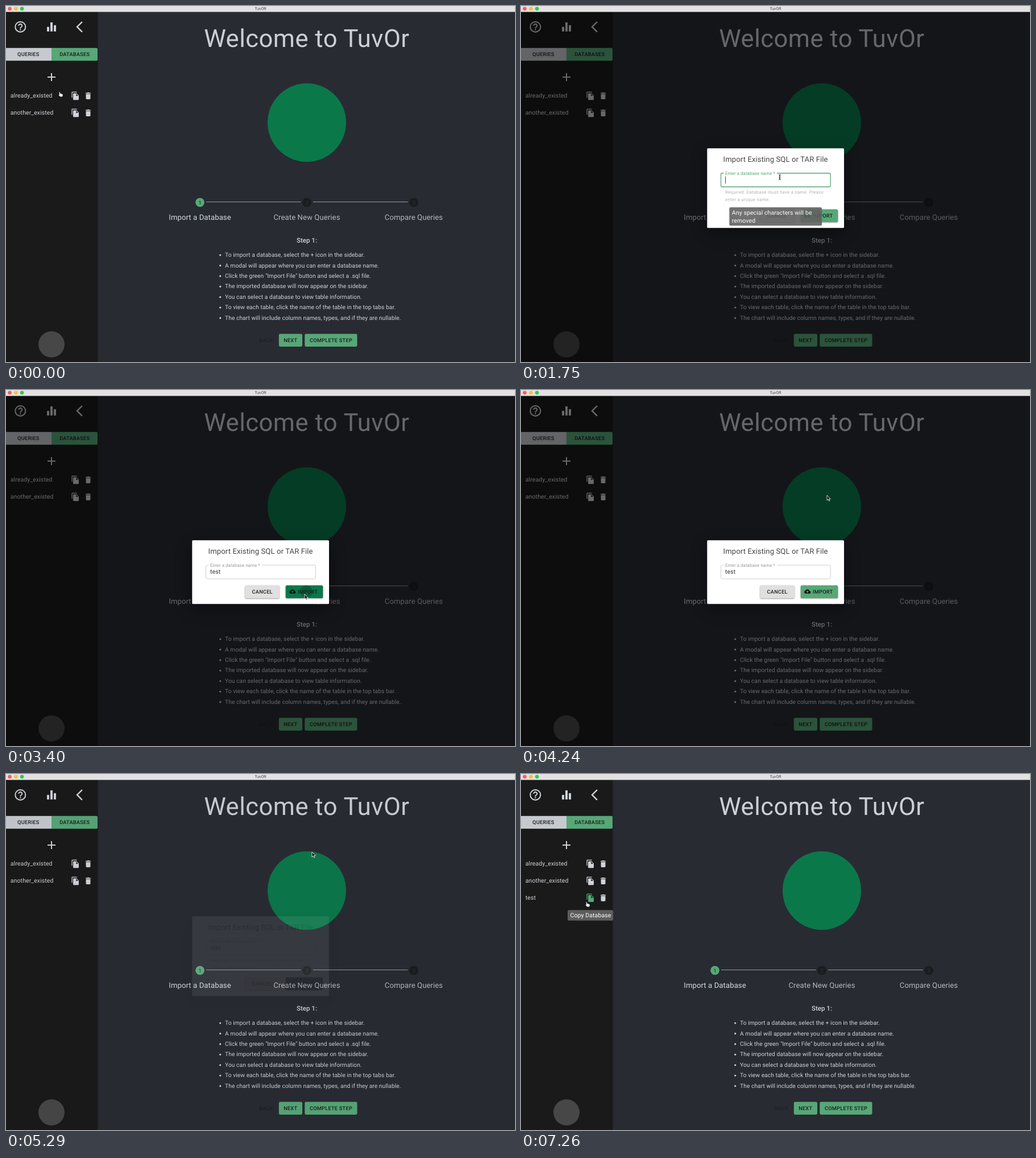
Animation, 895 px wide and 626 px high, one loop 8000 ms. Source, as an HTML page:

```html
<!DOCTYPE html>
<html lang="en">
<head>
<meta charset="utf-8">
<title>Database import</title>
<style>
  html, body { margin: 0; width: 100%; height: 100%; overflow: hidden; background: #292b33; }
  svg { display: block; width: 100vw; height: 100vh; }
  text { font-family: Roboto, sans-serif; white-space: pre; text-rendering: geometricPrecision; }
  .body { font-size: 10.5px; letter-spacing: .1px; }
  .item { font-size: 10.25px; letter-spacing: .06px; }
  .btn { font-size: 9.19px; font-weight: 500; letter-spacing: .26px; }
  .h6 { font-size: 13.1px; letter-spacing: .1px; }
  .helper { font-size: 7.87px; letter-spacing: .262px; }
  .mid { text-anchor: middle; }
  .raised { filter: drop-shadow(0 1px 1.2px rgba(0,0,0,.4)); }
  #paper { filter: drop-shadow(0 8px 14px rgba(0,0,0,.4)); }
</style>
</head>
<body>
<svg id="stage" viewBox="0 0 895 626" preserveAspectRatio="none"></svg>
<script>
const LOOP = 8000;
const GREEN = '#57a777', DEEP = '#0b784a', LIGHT = '#d0d3d8';

const icons = {
  help: 'M11 18h2v-2h-2zM12 2a10 10 0 1 0 0 20a10 10 0 1 0 0-20zm0 18a8 8 0 1 1 0-16a8 8 0 1 1 0 16zM12 6c-2.2 0-4 1.8-4 4h2c0-1.1.9-2 2-2s2 .9 2 2c0 2-3 1.75-3 5h2c0-2.25 3-2.5 3-5 0-2.2-1.8-4-4-4z',
  chart: 'M10 20h4V4h-4zM4 20h4v-8H4zM16 9v11h4V9z',
  copy: 'M16 1H4c-1.1 0-2 .9-2 2v14h2V3h12zM15 5l6 6v10c0 1.1-.9 2-2 2H8c-1.1 0-2-.9-2-2V7c0-1.1.9-2 2-2zM14 12h5.5L14 6.5z',
  trash: 'M6 19c0 1.1.9 2 2 2h8c1.1 0 2-.9 2-2V7H6zM19 4h-3.5l-1-1h-5l-1 1H5v2h14z',
  cloud: 'M19.35 10C18.7 6.6 15.6 4 12 4 9.1 4 6.6 5.6 5.35 8 2.3 8.4 0 10.9 0 14c0 3.3 2.7 6 6 6h13c2.8 0 5-2.2 5-5 0-2.6-2-4.8-4.65-5zM14 13v4h-4v-4H7l5-5 5 5z'
};

const rect = (x, y, w, h, fill, extra = '') =>
  `<rect x="${x}" y="${y}" width="${w}" height="${h}" fill="${fill}" ${extra}/>`;
const circle = (x, y, r, fill, extra = '') =>
  `<circle cx="${x}" cy="${y}" r="${r}" fill="${fill}" ${extra}/>`;
const text = (x, y, str, cls, fill = LIGHT, extra = '') =>
  `<text x="${x}" y="${y}" class="${cls}" fill="${fill}" ${extra}>${str}</text>`;
const line = (d, color, width, extra = '') =>
  `<path d="${d}" fill="none" stroke="${color}" stroke-width="${width}" ${extra}/>`;
const icon = (name, x, y, scale, fill = LIGHT, extra = '') =>
  `<path d="${icons[name]}" fill="${fill}" fill-rule="evenodd" transform="translate(${x} ${y}) scale(${scale}) translate(-12 -12)" ${extra}/>`;
const group = (id, inner) => `<g id="${id}">${inner}</g>`;

const row = (name, y, id = '') =>
  text(7.8, y + 3.3, name, 'body') +
  icon('copy', 122, y, .66, LIGHT, id && `id="${id}"`) +
  icon('trash', 144.5, y, .66);

const tooltip = (x, y, w, h, lines) =>
  rect(x, y, w, h, '#616161', 'rx="2.6" fill-opacity=".95"') +
  lines.map((s, i) => text(x + 4.5, y + 13 + i * 14, s, 'body', '#fff')).join('');

const titleBar = rect(0, 0, 895, 10, '#e3e2e3') + rect(0, 10, 895, .6, '#a9a9ab') +
  ['#fc5b57', '#fdbc40', '#34c84a'].map((c, i) => circle(6.5 + i * 10.8, 4.7, 3.3, c)).join('') +
  text(447.5, 7.2, 'TuvOR', 'mid', '#444', 'font-size="7"');

const sidebar = rect(0, 10, 161.5, 616, '#1a1a1a') +
  icon('help', 25.3, 36.7, 1) +
  icon('chart', 80, 36.7, 1) +
  line('M133.9 27.8L125 36.7l8.9 8.9', LIGHT, 2.4) +
  rect(0, 73.8, 80, 22.4, '#c6cad0') +
  `<path d="M80 73.8h79q2 0 2 2v18.4q0 2-2 2H80z" fill="${GREEN}"/>` +
  text(39.3, 88.1, 'QUERIES', 'btn mid', '#1c1c1c') +
  text(120.7, 88.1, 'DATABASES', 'btn mid', '#1c1c1c') +
  circle(80, 125, 12, '#fff', 'id="plusHover" fill-opacity=".16"') +
  line('M73 125h14M80 118v14', LIGHT, 2) +
  row('already_existed', 158) + row('another_existed', 188) +
  group('newRow', row('test', 217.7, 'newCopy')) +
  circle(80, 595, 23, '#474747');

const steps3 = ['Import a Database', 'Create New Queries', 'Compare Queries'].map((s, i) => {
  const x = 341 + i * 188;
  return circle(x, 345.3, 7.9, i ? '#1b1c1f' : GREEN) +
    text(x, 348.5, i + 1, 'mid', i ? '#34363c' : '#1b1c1f', 'font-size="9"') +
    text(x, 375.7, s, 'h6 mid', i ? '#b6b8bc' : '#d8dadd');
}).join('');

const bullets = [
  'To import a database, select the + icon in the sidebar.',
  'A modal will appear where you can enter a database name.',
  'Click the green "Import File" button and select a .sql file.',
  'The imported database will now appear on the sidebar.',
  'You can select a database to view table information.',
  'To view each table, click the name of the table in the top tabs bar.',
  'The chart will include column names, types, and if they are nullable.'
].map((s, i) => {
  const y = 437.6 + i * 18.45;
  return circle(376.7, y + .4, 1.6, LIGHT) + text(385, y + 3.5, s, 'item');
}).join('');

const main = text(348.2, 71.5, 'Welcome to TuvOr', '', '#ccd0d5', 'font-size="43.5" letter-spacing=".5"') +
  circle(529, 205, 69, DEEP) +
  line('M352 344.5H518.5M540 344.5H706.5', '#b4b5b8', .8) + steps3 +
  text(529, 416, 'Step 1:', 'mid', LIGHT, 'font-size="11.5" font-weight="500"') + bullets +
  text(457.5, 591, 'BACK', 'btn mid', '#1f2126') +
  rect(479.8, 576.6, 41.2, 22.4, GREEN, 'rx="2.4"') + text(500.2, 591, 'NEXT', 'btn mid', '#1c1c1c') +
  rect(525.3, 576.6, 92.2, 22.4, GREEN, 'rx="2.4"') + text(571.5, 591, 'COMPLETE STEP', 'btn mid', '#1c1c1c');

const dialog = '<rect id="paper" x="327.3" width="240.7" fill="#fff" rx="1.5"/>' +
  group('upper',
    text(447.6, 273.5, 'Import Existing SQL or TAR File', 'h6 mid', '#444') +
    rect(351.5, 294, 192.7, 24, 'none', 'id="field" rx="2.6"') +
    rect(356, 292, 94, 4, '#fff', 'id="notch"') +
    group('label', text(0, 0, 'Enter a database name *', 'body', 'inherit')) +
    text(359, 309.4, '', 'body', '#333', 'id="value"') +
    rect(359, 299.5, .9, 13, '#333', 'id="caret"')) +
  group('hint',
    text(359, 329.7, 'Required: Database must have a name. Please', 'helper', '#b2b2b2') +
    text(359, 342.6, 'enter a unique name.', 'helper', '#b2b2b2')) +
  group('lower',
    rect(420.3, 357.4, 60.6, 22.6, '#e0e0e0', 'rx="2.6" class="raised"') +
    text(450.7, 371.6, 'CANCEL', 'btn mid', '#222') +
    rect(491.7, 357.4, 65.6, 22.6, GREEN, 'id="import" rx="2.6" class="raised"') +
    circle(528, 368.5, 11, '#000', 'id="ripple" fill-opacity=".2"') +
    icon('cloud', 503.7, 368.3, .47, '#111') +
    text(530.7, 371.6, 'IMPORT', 'btn mid', '#1c1c1c'));

const pointers =
  '<path id="arrow" d="M0 0V9L2.1 7.1L3.5 10.2L5 9.5L3.6 6.5H6.3z" fill="#111" stroke="#fff" stroke-width=".8"/>' +
  '<path id="hand" d="M-3-4.3q1-1 1.7 0l1 2.5l3.2.8q1.4.4 1.2 2L3.5 4.3H-.8L-3.8.8q0-1.3 1.5-.5z" fill="#fff" stroke="#111" stroke-width=".7"/>' +
  '<path id="beam" d="M-2-4.5Q0-4.5 0-3V3Q0 4.5-2 4.5M2-4.5Q0-4.5 0-3V3Q0 4.5 2 4.5M-1 1H1" fill="none" stroke="#222" stroke-width=".9"/>';

document.getElementById('stage').innerHTML =
  rect(0, 0, 895, 626, '#292b33') + main + sidebar +
  rect(0, 10.5, 895, 616, '#000', 'id="backdrop"') + titleBar +
  group('dialog', dialog) +
  group('tipImport', tooltip(37.5, 147, 86, 18, ['Import Database'])) +
  group('tipField', tooltip(366.3, 354, 162.7, 32.3, ['Any special characters will be', 'removed'])) +
  group('tipCopy', tooltip(82, 239.3, 80, 18.5, ['Copy Database'])) +
  group('cursor', pointers);

const el = Object.fromEntries([...document.querySelectorAll('[id]')].map(n => [n.id, n]));

const initial = {
  cursor: ['hand', 96, 155.5], shade: 0, dialog: 0, compact: false, raised: 0, focus: false,
  value: '', caret: false, hover: false, ripple: 0, disabled: false,
  plus: false, tipImport: 0, tipField: 0, tipCopy: 0, row: false, copyHover: false
};

// Each step lists only what changes at that time.
const timeline = [
  [0, {}],
  [210, { cursor: ['hand', 90, 138], plus: true }],
  [360, { cursor: ['hand', 86, 130], tipImport: .9 }],
  [560, { cursor: ['arrow', 84, 126], shade: .25, dialog: .45, tipImport: .5 }],
  [710, { shade: .47, dialog: .93, tipImport: .13 }],
  [860, { cursor: ['arrow', 240, 210], shade: .5, dialog: 1, tipImport: 0, plus: false }],
  [1070, { cursor: ['beam', 448, 304] }],
  [1280, { cursor: ['beam', 455, 301], focus: true, raised: .6 }],
  [1430, { raised: 1, caret: true, tipField: .5 }],
  [1600, { tipField: .95 }],
  [2050, { caret: false }],
  [2200, { tipField: 0, caret: true }],
  [2350, { value: 't', compact: true }],
  [2500, { value: 'te' }],
  [2650, { value: 'tes' }],
  [2800, { value: 'test' }],
  [2950, { cursor: ['beam', 475, 318] }],
  [3100, { cursor: ['arrow', 510, 348] }],
  [3250, { cursor: ['arrow', 525, 359], hover: true }],
  [3400, { focus: false, caret: false, ripple: 1 }],
  [3550, { ripple: .5 }],
  [3700, { ripple: 0 }],
  [3850, { cursor: ['arrow', 530, 318], hover: false }],
  [4050, { cursor: ['arrow', 536, 250] }],
  [4240, { cursor: ['arrow', 538, 185] }],
  [4390, { cursor: ['arrow', 538, 137] }],
  [5290, { shade: .03, dialog: .07, compact: false, disabled: true }],
  [5470, { shade: 0, dialog: 0 }],
  [5680, { cursor: ['arrow', 524, 139], row: true }],
  [5890, { cursor: ['arrow', 490, 146] }],
  [6040, { cursor: ['arrow', 410, 168] }],
  [6190, { cursor: ['arrow', 310, 194] }],
  [6340, { cursor: ['arrow', 215, 220] }],
  [6490, { cursor: ['arrow', 150, 235] }],
  [6640, { cursor: ['arrow', 120, 240] }],
  [6820, { cursor: ['arrow', 114, 238] }],
  [6970, { cursor: ['hand', 117, 229.5], copyHover: true }],
  [7120, { tipCopy: .6 }],
  [7260, { tipCopy: 1 }]
];

let state = initial;
const frames = timeline.map(([at, change]) => ({ at, state: state = { ...state, ...change } }));

const set = (node, attrs) => Object.entries(attrs).forEach(([k, v]) => node.setAttribute(k, v));
const show = (node, on) => node.setAttribute('opacity', Number(on));

function draw(s) {
  const [shape, x, y] = s.cursor;
  set(el.cursor, { transform: `translate(${x} ${y})` });
  ['arrow', 'hand', 'beam'].forEach(id => show(el[id], id === shape));

  show(el.backdrop, s.shade);
  show(el.dialog, s.dialog);
  const inset = s.compact ? 14 : 0;
  set(el.paper, { y: 250.3 + inset, height: 140 - 2 * inset });
  set(el.upper, { transform: `translate(0 ${inset})` });
  set(el.lower, { transform: `translate(0 ${-inset})` });
  show(el.hint, !s.compact);

  set(el.field, { stroke: s.focus ? GREEN : '#c2c2c2', 'stroke-width': s.focus ? 1.3 : .8 });
  set(el.label, {
    transform: `translate(359 ${309.4 - 12.2 * s.raised}) scale(${1 - .25 * s.raised})`,
    fill: s.focus ? GREEN : '#999'
  });
  show(el.notch, s.raised === 1);
  el.value.textContent = s.value;
  const caretX = 359 + (s.value ? el.value.getComputedTextLength() : 0);
  set(el.caret, { x: caretX });
  show(el.caret, s.caret);

  set(el.import, { fill: s.disabled ? '#333' : s.hover ? DEEP : GREEN });
  show(el.ripple, s.ripple);
  show(el.plusHover, s.plus);
  show(el.newRow, s.row);
  set(el.newCopy, { fill: s.copyHover ? GREEN : LIGHT });

  const grow = .75 + .25 * Math.min(1, s.tipImport / .9);
  set(el.tipImport, { transform: `translate(80 156) scale(${grow}) translate(-80 -156)` });
  ['tipImport', 'tipField', 'tipCopy'].forEach(id => show(el[id], s[id]));
}

let shown;
function tick() {
  const t = performance.now() % LOOP;
  const frame = frames.findLast(f => f.at <= t);
  if (frame !== shown) draw((shown = frame).state);
  requestAnimationFrame(tick);
}
tick();
</script>
</body>
</html>
```
